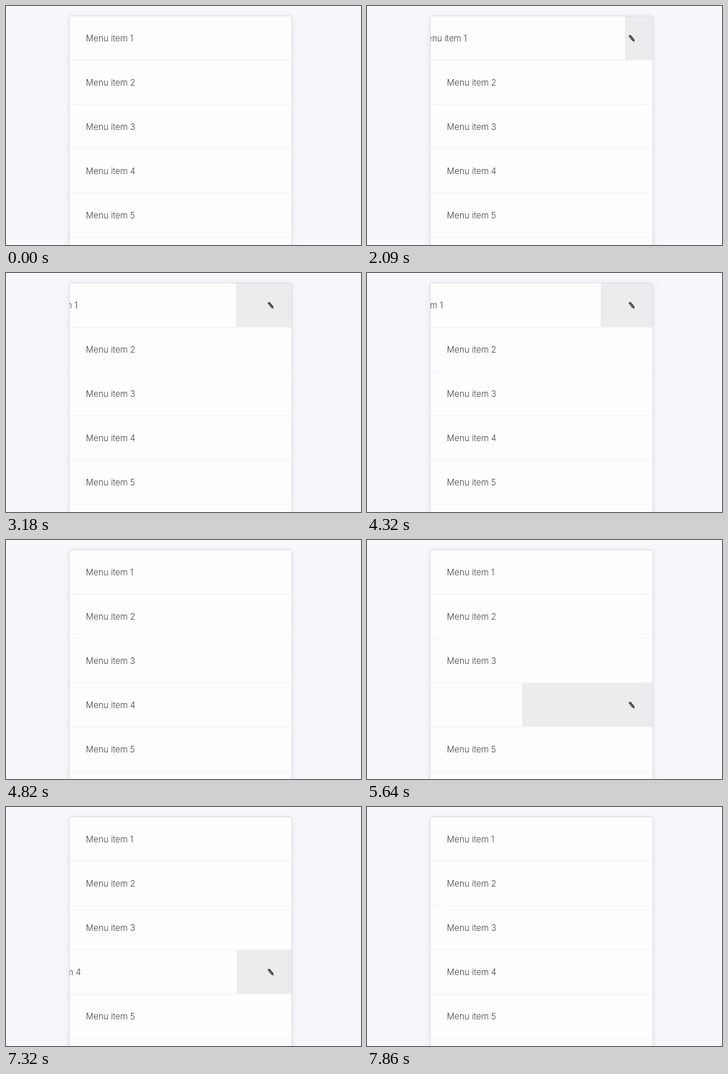
Write an HTML page that moves like this. It is 480 px wide and 324 px high and loops after 8000 ms.

```html
<!DOCTYPE html>
<html lang="en">
<head>
<meta charset="utf-8">
<title>Swipe menu</title>
<style>
  html, body { margin: 0; width: 100%; height: 100%; overflow: hidden; background: #f9f7fb; }
  .stage { position: relative; width: 100%; height: 100%; overflow: hidden; contain: strict; }
  .menu {
    position: absolute; left: 85px; top: 13px; bottom: -20px; width: 300px;
    border: 1px solid #e0dee2; border-radius: 3px; overflow: hidden; contain: paint;
    background: #fefdff; box-shadow: 0 1px 10px rgba(0, 0, 0, .08);
  }
  .row { position: relative; height: 59px; border-bottom: 1px solid #f2f1f5; overflow: hidden; background: #ecebed; }
  .row svg { position: absolute; left: 267px; top: 25px; }
  .item {
    position: absolute; top: 0; width: 278px; height: 59px; padding-left: 22px; background: #fefdff;
    font: 300 11.5px/60px Inter, "Liberation Sans", sans-serif; color: #444; white-space: nowrap;
  }
</style>
</head>
<body>
<div class="stage"><div class="menu"></div></div>
<script>
const LOOP = 8000, FPS = 22, REST = 75, SETTLE = 550;
const pencil = `<svg width="10" height="10" viewBox="0 0 10 10">
  <path d="M.7 2Q1.3.1 3.3.3L8.2 5.8 9 9.6 5.5 8Z" fill="#424143"/>
  <path d="M2.6 2.4 6.7 7" stroke="#8f8e90" stroke-width=".8"/></svg>`;

document.querySelector('.menu').innerHTML = [1, 2, 3, 4, 5, 6].map(n =>
  `<div class="row">${pencil}<div class="item">Menu item ${n}</div></div>`).join('');
const items = document.querySelectorAll('.item');

// Each swipe drags an item open, lets it settle at REST, then closes it.
const swipes = [
  { item: 0, start: 2091, from: 37, release: 2682, peak: 145.5, close: 4272 },
  { item: 3, start: 5318, from: 0, release: 5590, peak: 184, close: 7300 }
];

const mix = (a, b, p) => a + (b - a) * p;
const clamp = p => Math.min(1, Math.max(0, p));
const bezier = (a, b, u) => 3 * a * u * (1 - u) ** 2 + 3 * b * u * u * (1 - u) + u ** 3;

// The standard "ease" curve, solved by bisection.
function ease(p) {
  let low = 0, high = 1;
  for (let i = 0; i < 20; i++) {
    const mid = (low + high) / 2;
    if (bezier(.25, .25, mid) < p) low = mid; else high = mid;
  }
  return bezier(.1, 1, low);
}
const settle = (from, to, elapsed) => mix(from, to, ease(clamp(elapsed / SETTLE)));
const easeOut = p => 1 - (1 - p) ** 1.7;

function offset(s, t) {
  if (t < s.start) return 0;
  if (t < s.release) return mix(s.from, s.peak, easeOut((t - s.start) / (s.release - s.start)));
  if (t < s.close) return settle(s.peak, REST, t - s.release);
  return settle(REST, 0, t - s.close);
}

function draw() {
  const now = performance.now() % LOOP;
  const t = Math.floor((now + 10) * FPS / 1000) * 1000 / FPS + .5;
  for (const s of swipes) items[s.item].style.left = -offset(s, t) + 'px';
  requestAnimationFrame(draw);
}
draw();
</script>
</body>
</html>
```
